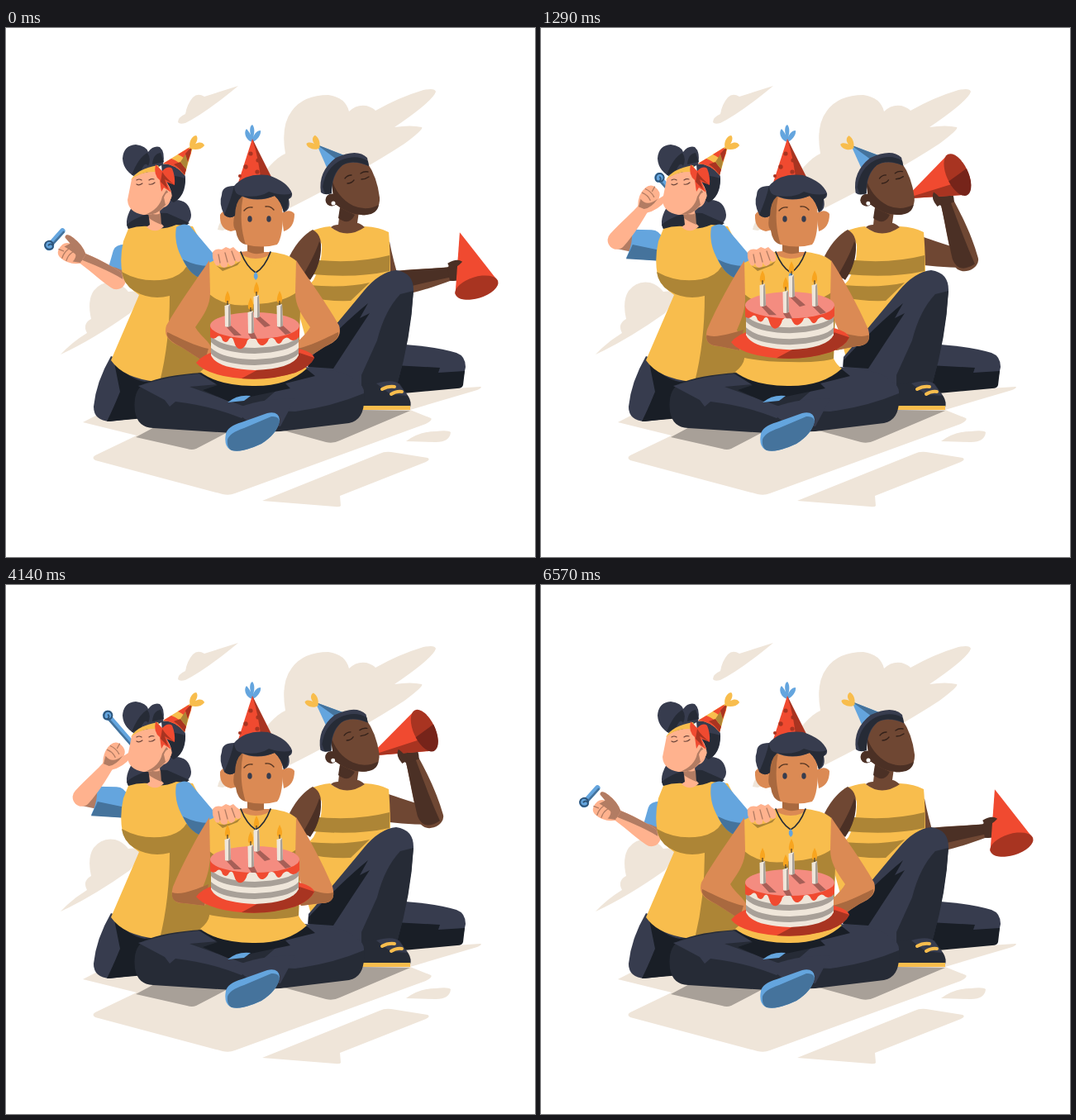
An HTML page for the animation above (7210 ms loop, 640 by 640 pixels).

```html
<!DOCTYPE html>
<html lang="en">
<head>
<meta charset="utf-8">
<title>Birthday party</title>
<style>
html, body { margin: 0; width: 100%; height: 100%; overflow: hidden; background: #fff; }
svg { display: block; width: 100vw; height: 100vh; }
.beige { fill: #efe5d9; } .shade { fill: #a8a098; }
.y { fill: #f8bd4d; } .yd { fill: #ad8536; }
.n { fill: #373c4e; } .n2 { fill: #262b36; } .n3 { fill: #191e26; }
.b { fill: #64a5de; } .bd { fill: #45739c; }
.r { fill: #f04a30; } .rd { fill: #a83421; } .rx { fill: #76241a; }
.s { fill: #ffb28e; } .sd { fill: #b27c63; }
.t { fill: #db8a54; } .td { fill: #a9693f; }
.k { fill: #6f4733; } .kd { fill: #4b3025; }
.w { fill: #efe6da; } .pink { fill: #f48c80; } .pd { fill: #a75f57; }
.line { fill: none; stroke-linecap: round; stroke-linejoin: round; }
</style>
</head>
<body>
<svg viewBox="0 0 640 640">
  <defs>
    <path id="pom" d="M0,3C-8,1 -11,-9 -7,-13C-4,-10 -2,-6 -1,-3C-4,-10 -3,-17 0,-18C3,-15 3,-8 1,-3C3,-8 6,-11 10,-11C11,-6 6,1 0,3Z"/>
    <path id="tuft" d="M0,4C-6,2 -9,-9 -4,-13C0,-12 1,-7 1,-4C3,-9 7,-11 11,-9C11,-3 6,2 0,4Z"/>
    <g id="candle">
      <path class="w" d="M-3.5,-25L3,-27L4,-1Q0,2 -3,0Z"/>
      <path class="shade" d="M1,-24L3,-27L4,-1L1,1Z"/>
      <path fill="#f8a51f" d="M0,-43Q5,-34 2,-29Q-1,-27 -3,-30Q-4,-35 0,-43Z"/>
      <path class="n2" d="M-.5,-31h1v5h-1z"/>
    </g>
  </defs>

  <g class="beige">
    <path d="M281,70L240,83Q232,78 226,84Q219,92 217,104Q208,108 208,114Q210,117 217,115Q240,104 281,70Z"/>
    <path d="M256,244Q258,230 280,215L318,168Q330,155 338,152Q332,118 346,100Q360,81 390,81Q411,84 415,101Q424,92 436,94Q445,97 447,100Q475,84 505,75Q519,72 520,77Q517,88 470,120Q490,117 503,120Q506,122 482,140Q430,174 345,217L262,245Z"/>
    <path d="M66,395Q80,380 98,369Q92,358 103,352Q98,330 106,318Q116,305 132,308Q142,311 148,319L170,317L150,345Q105,377 66,395Z"/>
    <path d="M93,477L130,458L480,440L574,434Q577,435 570,438L489,462L514,472Q517,475 505,480L277,563Q270,566 262,564L108,523Q103,520 108,517L158,493Z"/>
    <path d="M484,500Q500,488 520,488Q535,486 538,489Q537,501 520,501Z"/>
    <path d="M310,572L452,515Q458,512 466,513L510,520Q514,522 508,525L404,566L405,578Q404,580 398,579Z"/>
  </g>
  <path class="shade" d="M157,495L185,480L272,487L230,509Q225,511 219,509ZM325,484L387,501Q396,503 404,499L489,463L430,462Z"/>

  <!-- right friend -->
  <path class="n" d="M465,382Q515,384 545,393Q556,397 556,410L554,420L470,420Z"/>
  <path class="n3" d="M470,408L525,411L523,417L555,415L553,432Q552,436 546,436L470,443Z"/>
  <path class="k" id="kUpper" d="M0,-15Q30,-11 68,-9L72,10Q40,18 0,21Z"/>
  <g id="kFore">
    <path class="k" d="M-15,3C-15,-22 -10,-48 -8,-72L8,-72C13,-45 16,-20 15,4A14 11 0 0 1 -15,3Z"/>
    <path class="kd" d="M-15,-4C-13,-28 -10,-48 -8,-72L4,-72C5,-45 6,-18 9,10Q-14,16 -15,-4Z"/>
    <path class="kd" d="M-8,-69Q-17,-78 -14,-88Q-8,-90 -4,-82L-2,-92Q5,-95 8,-86Q11,-78 8,-69Z"/>
    <g id="horn" transform="translate(-47.5,-91) rotate(-7)">
      <path class="r" id="cone"/>
      <path class="rd lit" id="coneShade"/>
      <ellipse class="rd" id="bell" rx="13" ry="27"/>
      <path class="rx lit" id="bellShade" d="M-13,3L13,-2A13 27 0 0 1 -13,3Z"/>
    </g>
    <path class="kd" d="M-13,-70Q-18,-82 -12,-88Q-7,-82 -5,-72Z"/>
  </g>

  <path class="y" d="M366,247Q380,241 392,240Q412,256 434,240Q452,241 463,247Q465,270 465,300V330L420,345L372,409L350,330L372,305Q383,285 382,262Q378,250 366,247Z"/>
  <path class="yd" d="M379,281Q425,285 464,275V294Q425,303 370,298ZM366,311Q410,315 440,308L417,330Q390,331 366,326Z"/>
  <path class="k" d="M371,244Q382,250 381,265Q379,290 368,304L356,300L343,276Q355,253 371,244Z"/>
  <path class="kd" d="M379,258Q375,272 360,298L368,305Q382,285 381,262Z"/>
  <path class="k" d="M405,212L402,238Q396,238 393,241Q412,256 434,241Q428,236 425,236L428,215Z"/>
  <path class="kd" d="M404,217L402,230Q415,240 422,226Z"/>
  <g id="kHead">
    <path class="b" d="M376,141L409,154L389,171Z"/>
    <path class="bd" d="M376,141L409,154L400,159Z"/>
    <use href="#tuft" class="y" transform="translate(376,143) rotate(-60) scale(.95)"/>
    <path class="k" d="M393,172Q412,158 437,163Q449,180 452,205Q453,222 436,226Q417,228 397,212Z"/>
    <circle class="kd" cx="394" cy="208" r="7.5"/>
    <path class="kd" d="M393,180Q400,205 420,215Q436,222 451,214Q449,225 436,226Q417,228 397,212Z"/>
    <path class="n" d="M381,199Q377,174 399,157Q425,145 437,157L439,167Q420,159 407,166Q394,178 394,200Q386,203 381,199Z"/>
    <path class="n2" d="M383,192Q387,169 405,160Q424,152 438,161L439,167Q420,158 407,166Q393,177 394,200L386,201Z"/>
    <path class="line" stroke="#33211a" stroke-width="1.3" d="M410,182Q413,178 418,178M429,176Q433,173 438,174M413,188Q418,188 421,184M430,183Q435,183 439,180"/>
    <circle cx="396" cy="212" r="2.5" fill="#fff"/>
  </g>
  <path class="n" d="M365,410L366,398Q395,364 433,318Q452,295 472,293Q493,296 493,317Q489,375 473,432L425,442Z"/>
  <path class="n3" d="M438,333Q405,360 366,402V410L396,412Q418,378 440,345L428,351Z"/>
  <path class="n2" d="M477,322Q458,342 449,378L430,420V434L473,432Q490,375 493,318Z"/>
  <path class="n2" d="M428,433Q450,425 476,430L487,446Q491,453 489,459H430Z"/>
  <path class="n" d="M448,430Q468,424 476,431L486,445L465,443Z"/>
  <path class="y" d="M428,457H489V462H428Z"/>
  <path class="line" stroke="#f8bd4d" stroke-width="4" d="M455,437Q462,433 470,434M466,443Q472,439 479,440"/>

  <!-- left friend -->
  <path class="n" d="M152,217Q170,202 205,208Q222,208 224,226Q224,237 210,241L150,246Q141,236 152,217Z"/>
  <path class="n2" d="M146,238Q165,222 195,224L222,236L205,248L150,247Z"/>
  <g id="wUpper">
    <path class="sd" d="M30,-12L58,-11Q66,0 58,11L30,14Z"/>
    <path class="b" d="M0,0Q6,-17 18,-16L42,-14Q38,2 45,21L0,20Z"/>
    <path class="bd" d="M39,4Q42,14 45,22L0,20V8Z"/>
  </g>
  <g id="wFore">
    <path class="s" d="M-11,0C-10,-20 -6,-36 -6,-52L7,-52C10,-34 12,-14 11,2A11 11 0 0 1 -11,0Z"/>
    <path class="sd turned" d="M-2,-52L7,-52C10,-34 12,-14 11,2L5,7C5,-14 1,-32 -2,-52Z"/>
    <g class="line" transform="translate(16,-86) rotate(-80)">
      <path id="tube" stroke="#64a5de" stroke-width="6.5"/>
      <path id="tubeShade" stroke="#45739c" stroke-width="2.5"/>
      <g id="curl">
        <circle r="6" fill="#64a5de"/>
        <path stroke="#2e557a" stroke-width="2" d="M-3,4A5 5 0 1 0 -4,-2A3 3 0 1 0 1,0"/>
      </g>
    </g>
    <g transform="translate(0,-50)">
      <path class="s" d="M-6,3Q-15,-8 -13,-20Q-12,-27 -6,-28Q6,-29 8,-20L11,-29Q15,-32 16,-25Q16,-8 7,3Z"/>
      <path class="sd turned" d="M-3,3Q2,-8 1,-24L8,-20L11,-29Q15,-32 16,-25Q16,-8 7,3Z"/>
      <path class="sd" d="M-9,-6Q3,-3 7,-19Q8,-6 2,1L-5,3Z"/>
      <path class="line" stroke="#b27c63" stroke-width="1.3" d="M-12,-19Q-5,-21 2,-18M-12,-13Q-5,-15 1,-12M-5,-28L-4,-22"/>
    </g>
  </g>

  <path class="n" d="M127,397Q109,428 106,458Q106,475 126,476L168,471L185,420Z"/>
  <path class="n3" d="M131,405Q150,425 168,428L190,425L168,472L122,476Q130,460 138,440Z"/>
  <path class="y" d="M148,243Q160,239 173,240Q187,246 206,238L226,240L252,290V415Q220,428 183,428Q142,424 127,402L161,323Q145,312 141,299Q137,280 142,258Z"/>
  <path class="yd" d="M140,295Q165,309 194,304Q212,300 218,289L252,295V415Q220,427 186,428Q198,380 198,324Q175,330 155,318Q142,310 140,295Z"/>
  <path class="b" d="M206,241Q215,235 222,239L255,278L236,303Q222,298 212,277Q203,259 206,241Z"/>
  <path class="bd" d="M214,280Q230,288 246,288L236,303Q222,298 214,280Z"/>
  <path class="s" d="M172,219L174,238Q171,240 170,241Q181,250 191,240L187,236L186,219Z"/>
  <path class="sd" d="M172,222Q180,228 187,224L188,238Q178,234 173,230Z"/>
  <path class="n" d="M188,165Q212,160 217,180Q218,204 202,211Q192,210 190,190ZM160,182Q142,174 141,158Q142,142 157,141Q170,143 172,150Q178,142 186,144Q193,150 190,165Z"/>
  <path class="n2" d="M198,178Q212,180 217,182Q216,204 203,211Q192,207 198,178ZM152,178Q160,157 171,151Q176,158 172,167Q168,160 163,174ZM177,165Q178,152 187,151L191,162Z"/>
  <path class="s" d="M152,183Q160,174 183,173Q196,185 200,198Q200,215 191,217Q182,227 166,226Q148,223 147,208Z"/>
  <path class="sd" d="M194,196Q199,200 197,210L190,217Q184,226 168,226Q186,219 189,204Z"/>
  <path class="s" d="M191,205Q194,197 200,199Q203,206 193,214Z"/>
  <path class="y" d="M151,184Q159,170 184,166L188,175Q166,171 151,184Z"/>
  <path class="line" stroke="#6d463c" stroke-width="1.2" d="M158,184Q161,182 164,184M173,184Q176,182 179,183M158,189Q161,191 165,188M173,189Q177,190 180,187"/>
  <path class="y" d="M227,141L190,164Q206,165 216,178Z"/>
  <path class="r" d="M221,145L208,153Q215,156 220,162L224,151ZM200,158L190,164Q206,165 216,178L218,171Q209,161 200,158Z"/>
  <path class="rd" d="M226,142L217,152L220,162ZM211,162L203,165Q211,170 216,178L218,171Z"/>
  <path class="yd" d="M217,153L211,162L218,171L220,162Z"/>
  <use href="#tuft" class="y" transform="translate(226,143) rotate(35)"/>
  <path class="r" d="M181,165L189,173Q196,166 201,170Q205,180 204,190L194,186L200,199L191,193L188,198L186,184Q178,178 181,165Z"/>
  <path class="rd" d="M189,174Q193,181 204,190L192,183L196,195L187,186Z"/>

  <!-- birthday man -->
  <path class="n2" d="M238,417Q190,420 168,430Q153,438 156,464Q159,483 178,484L274,490L332,488L415,478Q436,474 433,440L305,428Z"/>
  <path class="n" d="M160,433Q200,420 238,418L256,431L222,434L300,462L285,472Q248,457 205,452L198,458L192,450Z"/>
  <path class="n" d="M360,410Q405,412 422,425Q434,433 433,442Q395,458 350,464L300,462Z"/>
  <path class="n3" d="M232,417Q300,440 363,412L374,421L338,430L344,436L296,446L270,452L238,438L256,432Z"/>
  <path class="n" d="M275,462Q305,448 350,448L332,482L295,478Z"/>
  <path class="b" d="M268,453Q280,443 296,445L288,451Z"/>
  <path class="b" d="M266,491Q268,482 285,477L316,466Q330,463 331,474Q329,490 309,503Q286,514 273,511Q263,507 266,491Z"/>
  <path class="bd" d="M268,498Q270,490 288,484L321,470Q330,469 331,476Q328,491 309,503Q286,514 273,511Q267,508 268,498Z"/>
  <path class="y" d="M246,284Q262,276 283,271L302,294L321,271Q345,274 352,283L356,340L354,400Q358,408 364,412Q340,434 298,433Q255,432 235,416Q245,408 246,400Z"/>
  <path class="yd" d="M246,322Q268,340 301,334Q335,333 354,318L356,340L354,400Q340,405 300,404Q270,404 246,399Z"/>
  <path class="t" d="M292,258H312V271H321L302,296L283,271L292,270Z"/>
  <path class="td" d="M292,260L312,261V272Q300,275 292,270Z"/>
  <path class="y" d="M283,271Q289,279 302,279Q316,279 321,271L330,280L302,300L274,280Z"/>
  <path class="line" stroke="#262b36" stroke-width="1.7" d="M284,271Q291,289 302,296Q313,290 320,271"/>
  <path class="b" d="M302,295Q306,299 304,303L302,305L300,302Q299,298 302,295Z"/>
  <path class="t arm"/><path class="td armShade"/>
  <g transform="translate(597,0) scale(-1,1)"><path class="t arm"/><path class="td armShade"/></g>

  <path class="s" d="M250,271Q254,266 261,268L266,265L271,267L275,265L279,269Q285,272 284,281Q281,285 277,281Q278,287 273,288Q269,287 268,283Q269,290 264,290Q259,289 259,284Q258,289 254,287Q249,280 250,271Z"/>
  <path class="line" stroke="#b27c63" stroke-width="1.3" d="M257,274L259,284M265,272L268,283M273,270L277,281"/>
  <path class="yd" d="M254,287Q258,290 264,290L273,288L284,282L280,287L262,294Z"/>

  <use href="#pom" class="b" transform="translate(298,135)"/>
  <path class="r" d="M298,134L280,190H323Z"/>
  <path class="rd" d="M298,134Q306,158 309,190L323,184Z"/>
  <g class="rd"><circle cx="296" cy="152" r="2.6"/><circle cx="290" cy="168" r="2.7"/><circle cx="304" cy="174" r="2.6"/><circle cx="305" cy="160" r="2.6"/><circle cx="283" cy="179" r="2"/></g>
  <path class="t" d="M278,224Q264,217 259,226Q258,243 272,246L280,244ZM333,224Q344,218 349,225Q349,242 336,246Z"/>
  <path class="t" d="M277,200H333L335,230Q334,255 328,262Q310,267 290,262Q276,245 277,200Z"/>
  <path class="td" d="M277,200L287,202Q281,235 290,262Q280,260 278,245Q273,240 277,224Z"/>
  <path class="n" d="M261,202Q261,191 276,191Q290,175 317,178Q341,186 346,200Q347,205 342,207Q345,220 336,223Q333,210 325,203Q304,212 284,203Q277,211 277,227Q270,232 264,226Q257,212 261,202Z"/>
  <path class="n2" d="M276,191Q276,202 286,203Q277,211 277,227Q270,232 264,226Q272,208 276,191ZM286,203Q306,206 318,198Q335,204 346,200L342,207L340,218L336,223Q333,210 325,203Q304,211 286,203Z"/>
  <g class="n"><ellipse cx="295" cy="231" rx="2.7" ry="3.8"/><ellipse cx="318" cy="231" rx="2.7" ry="3.8"/></g>
  <path class="line" stroke="#553522" stroke-width="1.4" d="M288,221Q292,216 298,217M314,216Q320,215 324,220"/>

  <g id="cake">
    <path class="r" d="M230,405Q238,394 258,390L350,387Q370,391 373,399Q368,410 350,417Q312,428 275,423Q240,418 230,405Z"/>
    <path class="rd" d="M285,424L311,410Q345,407 355,393L373,399Q368,410 350,417Q318,427 285,424Z"/>
    <path class="w" d="M248,366V396Q255,412 301,414Q347,412 354,396V366Z"/>
    <path class="shade" id="stripe" d="M248,373Q262,386 301,387Q345,385 354,373V380Q343,392 301,394Q260,393 248,380Z"/>
    <use href="#stripe" y="14"/>
    <path class="r" d="M247,360V374Q252,378 256,373Q260,371 262,378Q267,383 270,376Q274,372 276,380Q279,390 285,388Q290,386 292,378Q297,372 303,377Q306,385 311,384Q316,382 318,376Q324,373 327,380Q331,385 335,377Q340,372 344,377Q350,380 355,373V360Z"/>
    <ellipse class="pink" cx="301" cy="360" rx="54" ry="16"/>
    <path class="pd" d="M266,361L272,360L285,372L276,372ZM300,349L306,348L320,360L313,362ZM293,370L300,368L304,376H297ZM328,361L335,360L345,369L338,371Z"/>
    <use href="#candle" x="303" y="350"/>
    <use href="#candle" x="268" y="361"/>
    <use href="#candle" x="331" y="361"/>
    <use href="#candle" x="296" y="369"/>
  </g>
</svg>
<script>
const LOOP = 7210, START = 70, END = 6570;
const $ = id => document.getElementById(id);
const all = (cls, name, value) => document.querySelectorAll(cls).forEach(e => e.setAttribute(name, value));
const set = (id, attrs) => { for (const k in attrs) $(id).setAttribute(k, attrs[k]); };

const clamp = x => Math.max(0, Math.min(1, x));
const mix = (a, b, u) => a + (b - a) * u;
const ramp = (t, from, to) => clamp((t - from) / (to - from));
const smooth = u => u * u * (3 - 2 * u);

// 0 at rest, 1 when raised: quick ease-out up, soft ease back down.
const lift = (t, upLength, power, downFrom) =>
  1 - (1 - ramp(t, START, START + upLength)) ** power - smooth(ramp(t, downFrom, END));

const blow = t => smooth(ramp(t, 1500, 1900)) - smooth(ramp(t, 4300, 4700));
const breath = t => Math.cos(2 * Math.PI * (t - 1930) / 2280);

// Shoulder position, then [rest, raised] for upper arm angle, its length and forearm turn.
const woman = { id: 'w', x: 150, y: 262, angle: [112, 186], reach: [46, 58], turn: [-58, 39], size: 58, flip: -1 };
const friend = { id: 'k', x: 450, y: 264, angle: [69, 13], reach: [49, 65], turn: [80, -18], size: 66, flip: 1 };

function poseArm(a, u) {
  const angle = mix(...a.angle, u), reach = mix(...a.reach, u), turn = mix(...a.turn, u);
  const rad = angle * Math.PI / 180;
  const ex = a.x + reach * Math.cos(rad), ey = a.y + reach * Math.sin(rad);
  set(a.id + 'Upper', { transform: `translate(${a.x},${a.y}) rotate(${angle}) scale(${reach / a.size},${a.flip})` });
  set(a.id + 'Fore', { transform: `translate(${ex},${ey}) rotate(${turn})` });
  return turn;
}

const arm = ['M246,281C230,305 210,332 194,360C190,374 199,380 212,386L240,404L250,390C246,378 236,374 229,362C240,346 247,336 247,320Z',
  'M246,281C232,303 214,336 202,365C198,380 204,385 216,385L240,388L250,378C247,366 242,372 238,366C242,356 246,346 247,330Z'];
const armShade = ['M195,368C204,372 226,384 245,388L240,404L212,386C200,380 193,374 195,368Z',
  'M201,372C212,376 230,368 245,362L240,388L216,385C204,385 200,380 201,372Z'];

function morph([from, to], u) {
  const goal = to.match(/\d+/g);
  let i = 0;
  return from.replace(/\d+/g, n => mix(+n, +goal[i++], u).toFixed(2));
}

function drawMan(t) {
  const u = lift(t, 1860, 2, 4750);
  set('cake', { transform: `translate(0,${-28 * u})` });
  all('.arm', 'd', morph(arm, u));
  all('.armShade', 'd', morph(armShade, u));
}

function drawWoman(t) {
  const turn = poseArm(woman, lift(t, 1230, 3, 4450));
  all('.turned', 'opacity', clamp((20 - turn) / 30));
  const length = 24 + blow(t) * (25 + 6 * breath(t));
  set('tube', { d: `M0,0V${-length}` });
  set('tubeShade', { d: `M-2,0V${-length}` });
  set('curl', { transform: `translate(0,${-length})` });
}

function drawFriend(t) {
  const u = lift(t, 1400, 3, 5070);
  poseArm(friend, u);
  all('.lit', 'opacity', clamp(u * 2));
  const d = 70 + 3 * blow(t) * breath(t);
  set('cone', { d: `M0,0L${d},-27V27Z` });
  set('coneShade', { d: `M0,0L${d - 8},8L${d},27Z` });
  set('bell', { cx: d });
  set('bellShade', { transform: `translate(${d},0)` });
  set('kHead', { transform: `rotate(${-6.5 * Math.sin(Math.PI * ramp(t, 860, 4700)) ** 2} 412 225)` });
}

function draw(t) {
  drawMan(t);
  drawWoman(t);
  drawFriend(t);
}

const start = performance.now();
function tick(now) {
  draw(Math.max(0, now - start) % LOOP);
  requestAnimationFrame(tick);
}
draw(0);
requestAnimationFrame(tick);
</script>
</body>
</html>
```
